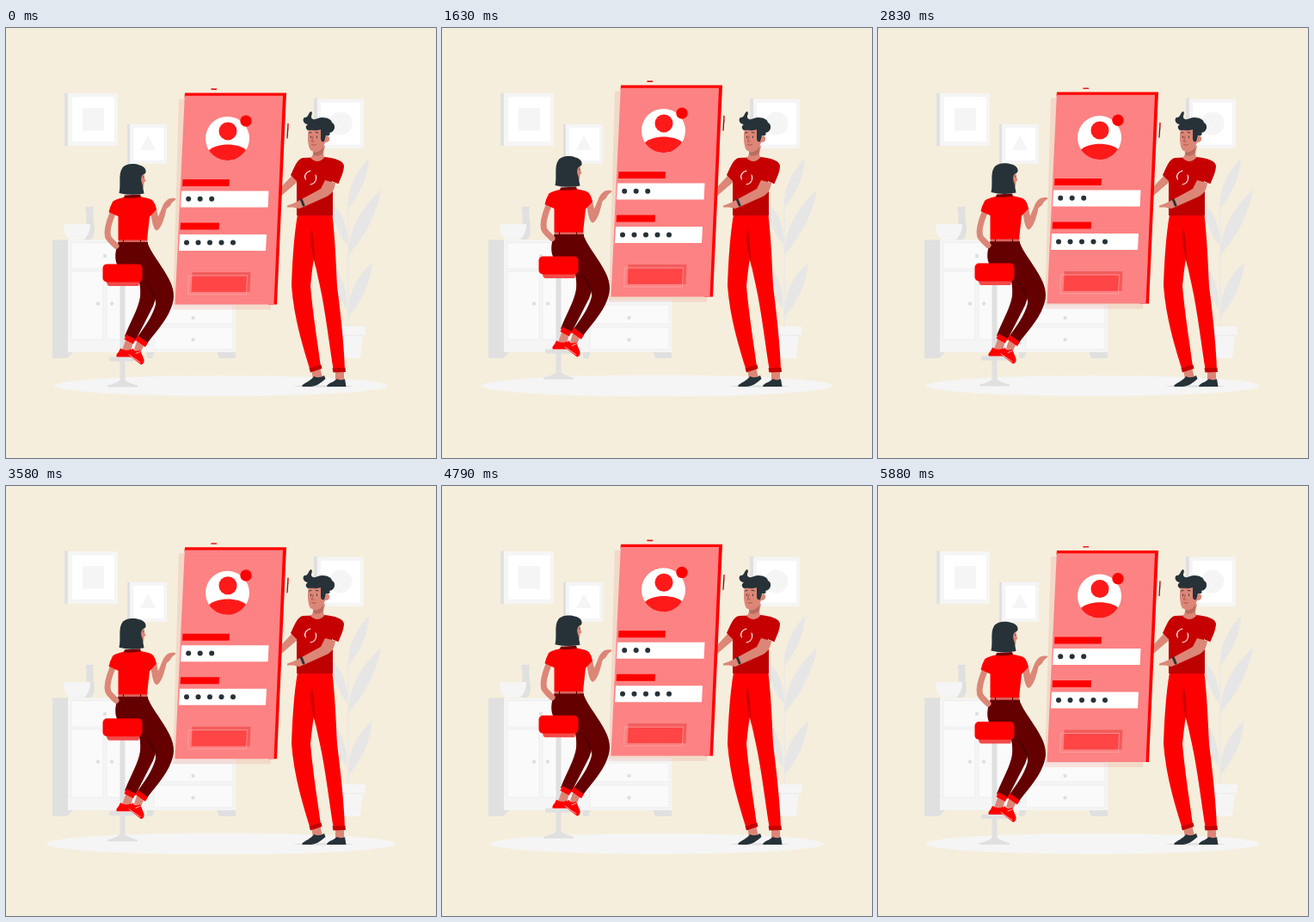
An HTML page that plays this animation: 500 by 500 pixels, repeating every 5930 ms.

```html
<!DOCTYPE html>
<html lang="en">
<head>
<meta charset="utf-8">
<style>
html, body { margin: 0; width: 100%; height: 100%; overflow: hidden; background: #f5eedc; }
svg { display: block; width: 100vw; height: 100vh; }
.red { fill: #f00; }
.ink { fill: #263238; }
.skin { fill: #dc8677; }
.pale { fill: #f5f5f5; }
.grey { fill: #e0e0e0; }
.leaf { fill: #e6e6e6; }
.white { fill: #fff; }
.panel { fill: #fafafa; stroke: #ebebeb; stroke-width: .8; }
.line { fill: none; stroke-linecap: round; stroke-linejoin: round; }
</style>
</head>
<body>
<svg viewBox="0 0 500 500">
  <ellipse id="floor" class="pale" cx="250" cy="416" rx="194" ry="12"/>

  <!-- pictures on the wall -->
  <g>
    <path class="grey" d="M68 75.5H73V137H68Z"/>
    <path class="pale" d="M72 76H130V137H72Z"/>
    <path class="white" d="M77 80.500H126V132H77Z"/>
    <path class="pale" d="M89 93H114V119.500H89Z"/>
    <path class="grey" d="M141 112H146V158H141Z"/>
    <path class="pale" d="M144 112H187V158H144Z"/>
    <path class="white" d="M148 116H183V154H148Z"/>
    <path class="pale" d="M165 125L174 142H156Z"/>
    <path class="grey" d="M358 82H364V140H358Z"/>
    <path class="pale" d="M362 82.500H416V140H362Z"/>
    <path class="white" d="M366 87H412V135.500H366Z"/>
    <circle class="pale" cx="389" cy="111" r="13.500"/>
  </g>

  <!-- cabinet, bowl and vase -->
  <g>
    <path class="grey" d="M92.500 208H102C100 221 103 226 103 236Q102 246 97 246H92Q95 225 92.500 208Z"/>
    <path class="pale" d="M67 228H98Q98 241 90 246H74Q67 241 67 228Z"/>
    <path class="grey" d="M54 246.500H73V377H78L71 384H54ZM245 376H267V384H248ZM164 376H173L170 384H164Z"/>
    <path class="pale" d="M72 246.500H165V316H267V377H72Z"/>
    <path class="panel" d="M76 249.500H160V280H76ZM76 283H113V362H76ZM117 283H160V362H117ZM172 322H264V344H172ZM172 348H264V374H172Z"/>
    <g class="grey">
      <circle cx="115" cy="265" r="2.200"/><circle cx="107" cy="320.500" r="2.200"/><circle cx="123" cy="320.500" r="2.200"/>
      <circle cx="217.500" cy="337" r="2.200"/><circle cx="217.500" cy="362.500" r="2.200"/>
    </g>
  </g>

  <!-- plant -->
  <g class="leaf">
    <path class="line" stroke="#e8e8e8" stroke-width="1.200" d="M398 205V348"/>
    <path d="M398 209C396 188 408 166 422 151C421 175 410 194 398 209Z"/>
    <path d="M398 264C398 234 414 208 436 188C431 218 415 245 398 264Z"/>
    <path d="M398 336C397 308 408 289 426 273C423 299 413 319 398 336Z"/>
    <path d="M397 252C385 240 381 222 377 202C391 214 398 230 397 252Z"/>
    <path d="M396 327C386 313 382 294 379 272C391 288 398 306 396 327Z"/>
    <path class="pale" d="M384 347H418V357H415L412 384H387Z"/>
    <path fill="#ebebeb" d="M387 357H415V358H387Z"/>
  </g>

  <!-- man -->
  <g>
    <ellipse class="grey" cx="369" cy="416.500" rx="34" ry="1.200"/>
    <path class="skin" d="M334 170L319 186V196L340 178Z"/>
    <path class="skin" d="M355 397L365 394L368 407L357 408ZM383 398H393V410H383Z"/>
    <path class="ink" d="M344 416C348 412 355 410 358 405Q364 408 370 404L371.500 408C366 413 360 417 354 417H345ZM373 417Q373 414 380 411.500L385 408Q390 410.500 394 408L395.500 417Z"/>
    <path class="red" d="M339 217H379.500C383 250 384 280 385 300C390 340 393 370 394 398L381 399C376 370 372 332 365 300L358 268C356 280 355 290 354 300C357 335 363 370 366 394L354 399C345 370 335 338 332 300C333 270 335 240 339 217Z"/>
    <path fill="#c90000" d="M355 232C353 246 355 258 358 269L360 279C358 262 359 246 355 232Z"/>
    <path fill="#c40000" d="M352.500 395.500L366.500 391.500L367.500 396L354 400.500ZM379.500 395.500L394.500 395L395 400L380.500 400.500Z"/>
    <path fill="#c60000" d="M345 151L370 150C382 151 392 154 393 160C393 167 389 175 386 181L379 178L380 218H338V178L331 171C335 163 338 153 345 151Z"/>
    <path fill="#bd0000" d="M380 190L380 218H338V210L350 208Z"/>
    <path class="skin" d="M356 137H371L369 146L370 151Q362 159 354 151Q359 148 356 137Z"/>
    <path fill="#b96d60" d="M357 144Q364 146 369 138L368.500 146Q363 150 358 148Z"/>
    <path class="skin" d="M352 117C350 127 351 137 354 142Q359 146 366 141C369 139 370 136 371 133C378 134 378 123 371 126L368 113Z"/>
    <path class="ink" d="M355 97C358 100 352 103 357 106C361 107 363 104 368 104C374 104 379 107 379 110C384 112 383 121 376 122C378 124 375 126 372 125L370 132C367 133 366 131 366 128L366 118C360 120 354 118 351 119C348 117 348 114 351 112C346 112 344 106 347 104C352 105 351 98 355 97Z"/>
    <path class="line" stroke="#263238" stroke-width=".9" d="M352.500 122L355 121.500M360 121L363 122M354.500 126V127.500M361.500 126V127.500"/>
    <path class="line" stroke="#a84f48" stroke-width=".9" d="M357 126L355.500 132H358M355.500 135.500Q358 137.500 360.500 135.500"/>
    <path class="line" stroke="#fff" stroke-width="1.100" d="M348.500 176C346 172 349 167 354 166M354 182C360 181 362 175 360 171"/>
    <path class="skin" d="M371 177L383 180C382 188 379 193 373 196L346 208L341 210L334 208.500L327 208.500L327 206.500L334 204L342 200L366 187Z"/>
    <path fill="#c60000" d="M368 173L386.500 181L391 169L383 160Z"/>
    <path class="line" stroke="#263238" stroke-width="3" d="M343.500 200L346 206"/>
  </g>

  <g id="float">
    <!-- phone -->
    <path fill="#e6968c" fill-opacity=".25" d="M201 82H319L308 327H194Z"/>
    <path class="red" d="M208 75H326L315 321H305L300 85L207.500 80Z"/>
    <path fill="#fc8283" d="M207.800 78.300H322L311.500 321H196.500Z"/>
    <path class="line" stroke="#e51b1b" stroke-width="1.600" d="M239 70.700H244.500"/>
    <path class="line" stroke="#c81a1a" stroke-width="1.500" d="M328 111L327.700 117"/>
    <path class="line" stroke="#52252a" stroke-width="1.300" d="M327.700 117L327 127.500"/>
    <circle class="white" cx="257.500" cy="128" r="25.500"/>
    <g fill="#ff1a1a">
      <circle cx="258" cy="119.500" r="10.500"/>
      <path d="M236 142C245 133 270 133 279 141.500A25.500 25.500 0 0 1 236 142Z"/>
    </g>
    <circle class="red" cx="279" cy="107.700" r="6.700"/>
    <path class="red" d="M205.500 175.500H260L259.500 183.500H205ZM203 226H248L247.600 234H202.600Z"/>
    <path class="white" d="M204 189H305.500L304.600 208H203ZM202 239.500H303L302 258.500H201Z"/>
    <g id="dots" class="ink"></g>
    <path fill="#f25c5c" d="M216.500 283.500H284.500L283.500 306.500H215.500Z"/>
    <path fill="#ff4545" d="M217 288H281L280.300 306H216Z"/>
    <path fill="none" stroke="#ffa8a8" stroke-width=".7" d="M212.500 287.500H280.500L279.500 309.500H211.500Z"/>

    <!-- stool -->
    <path class="grey" d="M132.500 298H138.500V409Q144 413 153 415V417H118V415Q128 413 132.500 409ZM120 382H150V387H120Z"/>

    <!-- woman -->
    <path class="skin" d="M140 360L148 364L145 376L135 374ZM153 361L161 367L156 378L149 373Z"/>
    <path class="red" d="M133 372Q140 376 145 373L151 381L146 382H129Q127 380 131 376Z"/>
    <path class="red" d="M147 372Q151 377 156 374L160.500 385Q161 390 157 391L143 380Z"/>
    <path class="line" stroke="#fff" stroke-width=".7" d="M143 379.500L156 388.500M151 378L156 376"/>
    <path fill="#640000" d="M148 270L172 285C176 300 176 311 171 323L150 364L138 358C145 340 154 326 156 312C157 300 155 290 148 280Z"/>
    <path fill="#480000" d="M158 290C168 295 174 305 173.500 318C171 309 166 298 158 290Z"/>
    <path fill="#640000" d="M131 248H164C169 262 178 271 187 287C196 302 197 313 192 325C186 341 172 355 163 368L152 360C161 347 170 336 174 321C175 310 169 300 160 292C148 291 136 286 131 278C125 269 127 258 131 248Z"/>
    <path class="red" d="M140 356L150.500 361.500L148 367L137.500 361.500ZM153 357L165 365.500L162 370.500L150.500 362.500Z"/>
    <path class="line" stroke="#dc8677" stroke-width="7" d="M124 215C119 227 117 236 118.500 242C120 246 124 249 128 253"/>
    <path class="skin" d="M168 213C170 225 171 233 175 235C180 234 184 222 186.500 210L191 206C193 201 197 200 197.500 198.500C197 197 191 197 188 199C185 201 183 204 182 207L177 219L175 210Z"/>
    <path fill="#d9625c" d="M131 244H164.500V249.500H130.500Z"/>
    <path fill="#640000" d="M130.500 248.700H165V250.500H130.500ZM136 245H137V249H136ZM156 245H157V249H156Z"/>
    <path class="red" d="M138 196C132 198 127 198.500 124 201.500Q121 207 119.500 213.500L130.500 218.500V246H164L167 219L175 210.500C174 205 172 201 169 199C165 197 160 196.500 156 195.500Z"/>
    <path fill="#760000" d="M138 194L156 193L157 196Q147 198 137 197Z"/>
    <path class="skin" d="M154 167L161 167.500L160.500 173L162.500 177.500L160.500 179L160 185L154 187Z"/>
    <path class="ink" d="M131.500 191.500C134 182 130 169 135.500 162C139 157.500 149 156.500 155 159C161 160 164 165 162 168.500C157 170 156 175 158.500 181L160.500 192Q146 195 131.500 191.500Z"/>
    <path class="line" stroke="#263238" stroke-width=".9" d="M160 172.500V173.500"/>
    <path fill="#f24a4a" d="M117 293H156L154 299.500H120Q117 299 117 293Z"/>
    <rect class="red" x="112.500" y="274" width="46" height="21" rx="5"/>
  </g>
</svg>
<script>
const LOOP = 5930, CYCLE = LOOP / 2;
const float = document.getElementById('float');
const floor = document.getElementById('floor');

const dotRow = (count, x, y) => Array.from({ length: count }, (_, i) =>
  `<circle cx="${x + i * 13.5}" cy="${y}" r="3"/>`).join('');
document.getElementById('dots').innerHTML = dotRow(3, 212.2, 198.3) + dotRow(5, 210, 249);

// [share of cycle, scale] with linear steps between
const beat = [[0, 1], [.1, 1.1], [.3, 1], [.4, 1], [.5, 1.1], [.6, 1], [1, 1]];

function beatAt(p) {
  const i = beat.findIndex(key => p < key[0]);
  const [a, from] = beat[i - 1], [b, to] = beat[i];
  return from + (to - from) * (p - a) / (b - a);
}

const start = performance.now();
function draw() {
  const p = (performance.now() - start) % CYCLE / CYCLE;
  const rise = 1 - Math.abs(1 - 2 * p);
  float.setAttribute('transform', `translate(0 ${.4 - 10 * rise})`);
  const scale = beatAt(p);
  floor.setAttribute('rx', 194 * scale);
  floor.setAttribute('ry', 12 * scale);
  requestAnimationFrame(draw);
}
draw();
</script>
</body>
</html>
```
